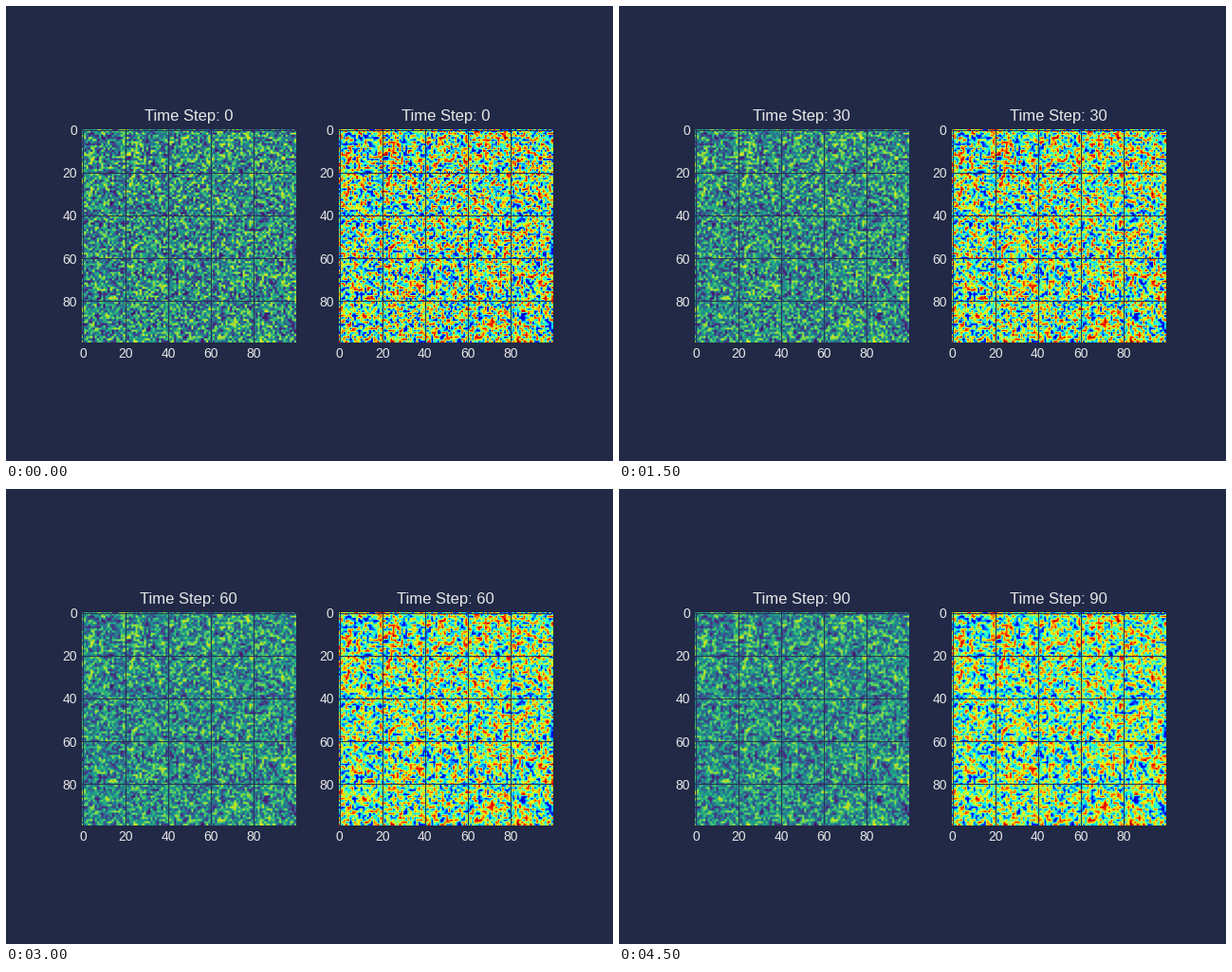
Write a matplotlib script that moves like this. It is 640 px wide and 480 px high and loops after 5000 ms.

```python
import numpy as np
import matplotlib.pyplot as plt
from matplotlib.animation import FuncAnimation

plt.rcParams.update({
    "font.family": "Liberation Sans",
    "font.size": 10,
    "axes.titlesize": 12,
    "figure.facecolor": "#212946",
    "axes.facecolor": "#212946",
    "text.color": "0.9",
    "xtick.color": "0.9",
    "ytick.color": "0.9",
    "grid.color": "#2A3459",
})

SIZE = 100
FRAMES = 10
STEPS = 10          # simulation steps between two pictures
RATE = 0.001        # diffusion per step


def diffuse(u):
    """One explicit diffusion step with closed edges."""
    p = np.pad(u, 1, mode="edge")
    lap = p[:-2, 1:-1] + p[2:, 1:-1] + p[1:-1, :-2] + p[1:-1, 2:] - 4 * u
    return u + RATE * lap


def simulate():
    np.random.seed(0)
    u = np.random.rand(SIZE, SIZE)
    states = []
    for _ in range(FRAMES):
        states.append(u)
        for _ in range(STEPS):
            u = diffuse(u)
    return states


states = simulate()
fig, axes = plt.subplots(1, 2, figsize=(6.4, 4.8), dpi=100)
images = []
for ax, cmap in zip(axes, ("viridis", "jet")):
    images.append(ax.imshow(states[0], cmap=cmap, interpolation="hanning"))
    ax.set_xticks(range(0, SIZE, 20))
    ax.set_yticks(range(0, SIZE, 20))
    ax.tick_params(length=0, pad=3.5)
    ax.grid(True, linewidth=0.8)
    ax.spines[:].set_visible(False)


def update(i):
    for ax, im in zip(axes, images):
        im.set_data(states[i])
        im.autoscale()
        ax.set_title(f"Time Step: {i * STEPS}")
    return images


anim = FuncAnimation(fig, update, frames=FRAMES, interval=500,
                     init_func=lambda: update(0), repeat=True, repeat_delay=0)
plt.show()
```
